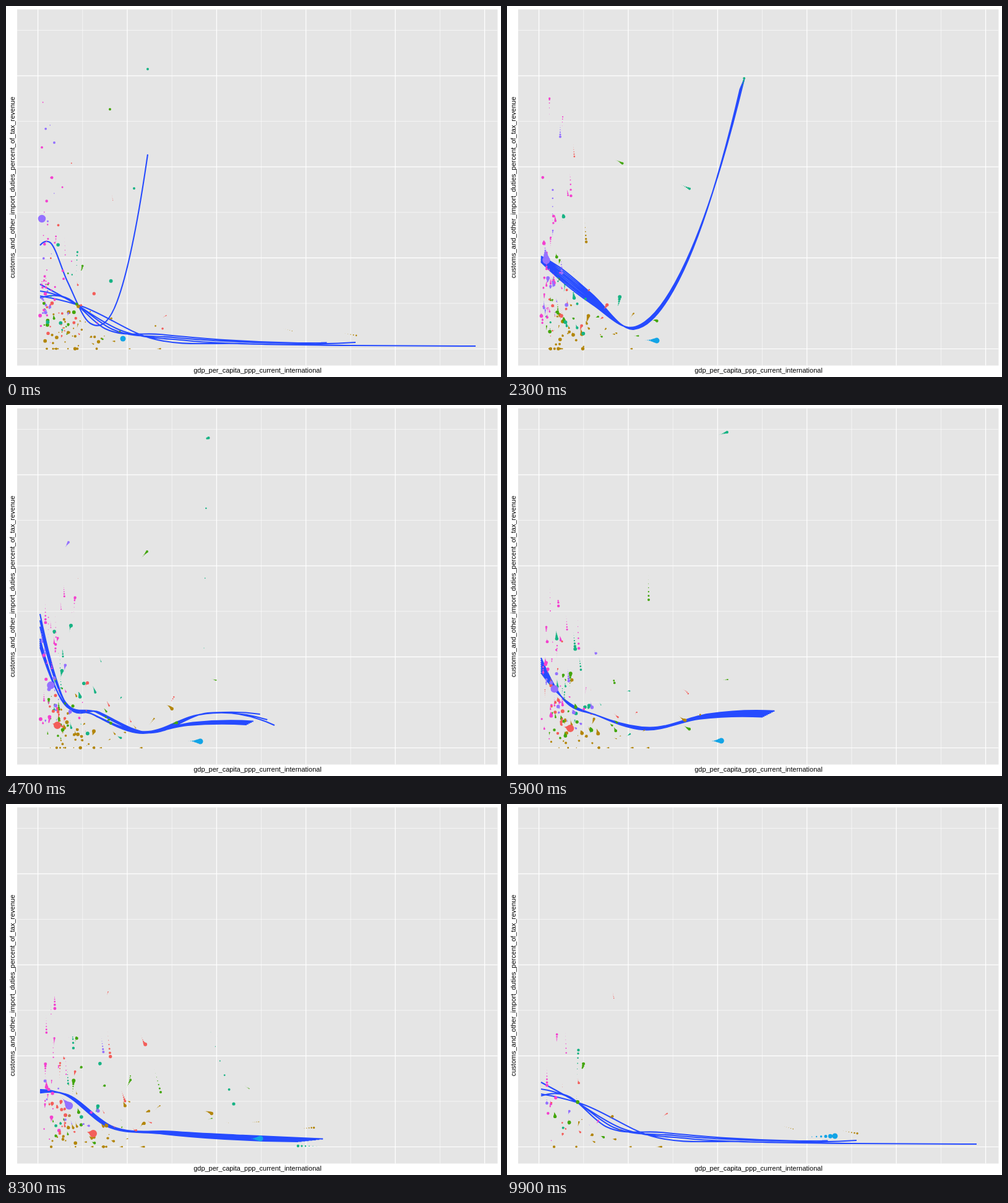
An HTML page for the animation above (10 s loop, 800 by 600 pixels).

```html
<!DOCTYPE html>
<html lang="en">
<head>
<meta charset="utf-8">
<title>Import duties and income</title>
<style>
html, body { margin: 0; width: 100%; height: 100%; overflow: hidden; background: #fff; }
svg { display: block; width: 800px; height: 600px; }
text { font: 11px "Liberation Sans", Arial, sans-serif; text-anchor: middle; fill: #000; }
</style>
</head>
<body>
<svg viewBox="0 0 800 600">
  <rect x="18" y="5.5" width="776.5" height="576" fill="#e5e5e5"/>
  <path id="minor" stroke="#fff" stroke-width=".6"/>
  <path id="major" stroke="#fff" stroke-width="1.2"/>
  <path id="curves" fill="none" stroke="#264bff" stroke-width="2.1"/>
  <g id="dots"></g>
  <text x="406.5" y="593">gdp_per_capita_ppp_current_international</text>
  <text transform="translate(14 293.5) rotate(-90)">customs_and_other_import_duties_percent_of_tax_revenue</text>
</svg>
<script>
const FRAMES = 100, STEP = 100, WAKE = 8;
const AXIS = 52, FLOOR = 554.3;
const RED = '#f35e5a', GOLD = '#b3860b', GREEN = '#43a60b', TEAL = '#17b384',
      BLUE = '#12a4e6', VIOLET = '#9471ff', PINK = '#f341cf';
const $ = id => document.getElementById(id);

let seed = 41;
const random = () => (seed = (seed * 16807) % 2147483647) / 2147483647;
const between = (a, b) => a + (b - a) * random();
const bell = () => random() + random() + random() + random() - 2;
const mix = (a, b, u) => a + (b - a) * u;

// Interpolates rows of [time, ...values]
function tween(rows, t) {
  let i = 1;
  while (i < rows.length - 1 && rows[i][0] <= t + 1e-6) i++;
  const a = rows[i - 1], b = rows[i], u = (t - a[0]) / (b[0] - a[0]);
  return a.slice(1).map((v, n) => mix(v, b[n + 1], u));
}

// Grid
const grid = (x0, y0) => {
  let d = '';
  for (let x = x0; x < 790; x += 144.4) d += `M${x} 5.5V581.5`;
  for (let y = y0; y > 10; y -= 147.2) d += `M18 ${y}H794.5`;
  return d;
};
$('minor').setAttribute('d', grid(123.8, 480.9));
$('major').setAttribute('d', grid(51.6, 554.5));

// Key poses of the smooth curve: time, right end, six heights
const poses = [
  [0, 229, 387, 382, 445, 513, 478, 240],
  [.7, 239, 408, 393, 436, 497, 484, 379],
  [.9, 276, 390, 407, 438, 496, 492, 320],
  [1.1, 342, 391, 414, 458, 520, 430, 119],
  [1.4, 375, 402, 416, 460, 524, 432, 138],
  [2.6, 386, 418, 450, 490, 517, 405, 112],
  [2.9, 307, 433, 456, 481, 520, 516, 402],
  [3.2, 317, 440, 456, 494, 521, 515, 428],
  [4.2, 434, 338, 466, 497, 530, 498, 518],
  [4.3, 389, 378, 468, 500, 530, 518, 517],
  [6.4, 446, 450, 474, 505, 519, 494, 488],
  [6.6, 557, 400, 488, 517, 522, 499, 524],
  [7.1, 544, 410, 487, 519, 532, 524, 536],
  [7.5, 518, 468, 469, 521, 529, 535, 541],
  [8.3, 472, 462, 469, 520, 533, 542, 546],
  [9.6, 759, 469, 484, 537, 546, 549, 550],
  [9.7, 565, 450, 475, 524, 541, 547, 544],
  [9.9, 472, 472, 470, 522, 531, 540, 545],
];

function curvePath(t) {
  if (t > 8.85 && t < 9.55) return '';  // too few reports for a fit
  const [right, ...heights] = tween(poses, t), last = heights.length - 1;
  const pts = heights.map((y, n) => [mix(55, right, (n / last) ** 1.5), y]);
  const secant = n => (pts[n + 1][1] - pts[n][1]) / (pts[n + 1][0] - pts[n][0]);
  const width = n => pts[n + 1][0] - pts[n][0];
  const inner = n => (secant(n - 1) * width(n) + secant(n) * width(n - 1)) / (width(n) + width(n - 1));
  const slope = n => n === 0 ? 2 * secant(0) - inner(1)
    : n === last ? 2 * secant(last - 1) - inner(last - 1) : inner(n);
  let d = `M${pts[0]}`;
  for (let n = 1; n <= last; n++) {
    const [px, py] = pts[n - 1], [qx, qy] = pts[n], h = (qx - px) / 3;
    d += `C${px + h} ${py + h * slope(n - 1)} ${qx - h} ${qy - h * slope(n)} ${qx} ${qy}`;
  }
  return d;
}

// Dots: each has a lifetime and a position at time t
const dots = [];

// Incomes grow steadily, duties shrink and waver, reports come and go.
function region(color, count, income, incomeSpread, duty, dutySpread, dutyFree = 0) {
  for (let i = 0; i < count; i++) {
    const rich = income * Math.exp(incomeSpread * bell());
    const tax = random() < dutyFree ? 0 : Math.min(400, duty * Math.exp(dutySpread * bell()));
    const growth = between(.04, .09), waver = between(.03, .25);
    const pace = between(1, 3), phase = between(0, 6.28);
    const start = between(-5, 9), life = between(1.5, 6);
    dots.push({
      color, r: .8 + 2.2 * random() ** 1.3, wraps: true, start,
      end: random() < .6 ? Math.min(start + life, between(8.6, 9.2)) : start + life,
      at: t => [AXIS + rich * Math.exp(growth * t),
                FLOOR - tax * Math.exp(-.05 * t) * (1 + waver * Math.sin(pace * t + phase))],
    });
  }
}
region(GOLD, 135, 55, 1.1, 34, 1.2, .25);
region(GREEN, 65, 36, 1.1, 75, 1.3);
region(TEAL, 36, 34, 1, 105, 1.2);
region(PINK, 100, 14, 1.1, 135, 1.1);
region(RED, 70, 30, 1.2, 80, 1.2);
region(VIOLET, 42, 18, 1, 140, 1);

// Countries that stand out: rows of time, x, y
function landmark(color, r, ...rows) {
  dots.push({ color, r, wraps: false, start: rows[0][0], end: rows.at(-1)[0], at: t => tween(rows, t) });
}
landmark(BLUE, 4.5, [0, 189, 538], [1.4, 215, 540], [4.7, 314, 544], [8.3, 411, 541], [9.9, 530, 537]);
landmark(VIOLET, 6.2, [0, 58, 344], [1.4, 60, 376], [3.2, 67, 446], [7.1, 81, 465], [8.3, 102, 488]);
landmark(VIOLET, 2, [0, 78, 221], [1.4, 86, 178], [3.2, 86, 245], [4.7, 101, 222]);
landmark(RED, 6, [3.8, 72, 514], [4.7, 83, 518], [8.3, 141, 533], [9, 152, 535]);
landmark(GREEN, 2, [0, 168, 167], [1.4, 169, 245], [3.2, 204, 264], [4.7, 228, 237], [7.1, 230, 393], [8.3, 250, 466]);
landmark(TEAL, 2, [0, 207, 295], [1.4, 273, 285], [3.2, 317, 306]);
landmark(TEAL, 2, [0, 229, 102], [1, 333, 100], [1.4, 375, 153], [2.6, 386, 105]);
landmark(TEAL, 2.2, [4.3, 320, 393], [4.6, 325, 54], [6.8, 377, 37]);
landmark(TEAL, 2.6, [6.6, 425, 405], [7.1, 404, 412], [7.8, 331, 369], [8.3, 368, 485]);
landmark(TEAL, 2.2, [6.7, 557, 554], [7.1, 544, 554], [8.3, 472, 553]);

const layers = {};
for (const color of [GOLD, GREEN, TEAL, PINK, RED, VIOLET, BLUE]) {
  layers[color] = document.createElementNS('http://www.w3.org/2000/svg', 'path');
  layers[color].setAttribute('fill', color);
  $('dots').append(layers[color]);
}

const circle = (x, y, r) =>
  `M${(x - r).toFixed(2)} ${y.toFixed(2)}a${r} ${r} 0 1 0 ${2 * r} 0a${r} ${r} 0 1 0 ${-2 * r} 0`;

// Every frame also shows the frames before it, with shrinking dots.
function draw(frame) {
  const shapes = {};
  let lines = '';
  for (let k = WAKE - 1; k >= 0; k--) {
    const t = (frame - k + FRAMES) % FRAMES / 10;
    const shrink = (1 - k / WAKE) ** 2;
    lines += curvePath(t);
    for (const dot of dots) {
      if (t < dot.start || t > dot.end || (k > frame && !dot.wraps)) continue;
      const [x, y] = dot.at(t);
      shapes[dot.color] = (shapes[dot.color] || '') + circle(x, y, +(dot.r * shrink).toFixed(2));
    }
  }
  $('curves').setAttribute('d', lines);
  for (const color in layers) layers[color].setAttribute('d', shapes[color] || '');
}

let begin, last = -1;
function tick(time) {
  begin ??= time;
  const frame = Math.floor((time - begin) / STEP) % FRAMES;
  if (frame !== last) draw(last = frame);
  requestAnimationFrame(tick);
}
draw(0);
requestAnimationFrame(tick);
</script>
</body>
</html>
```
